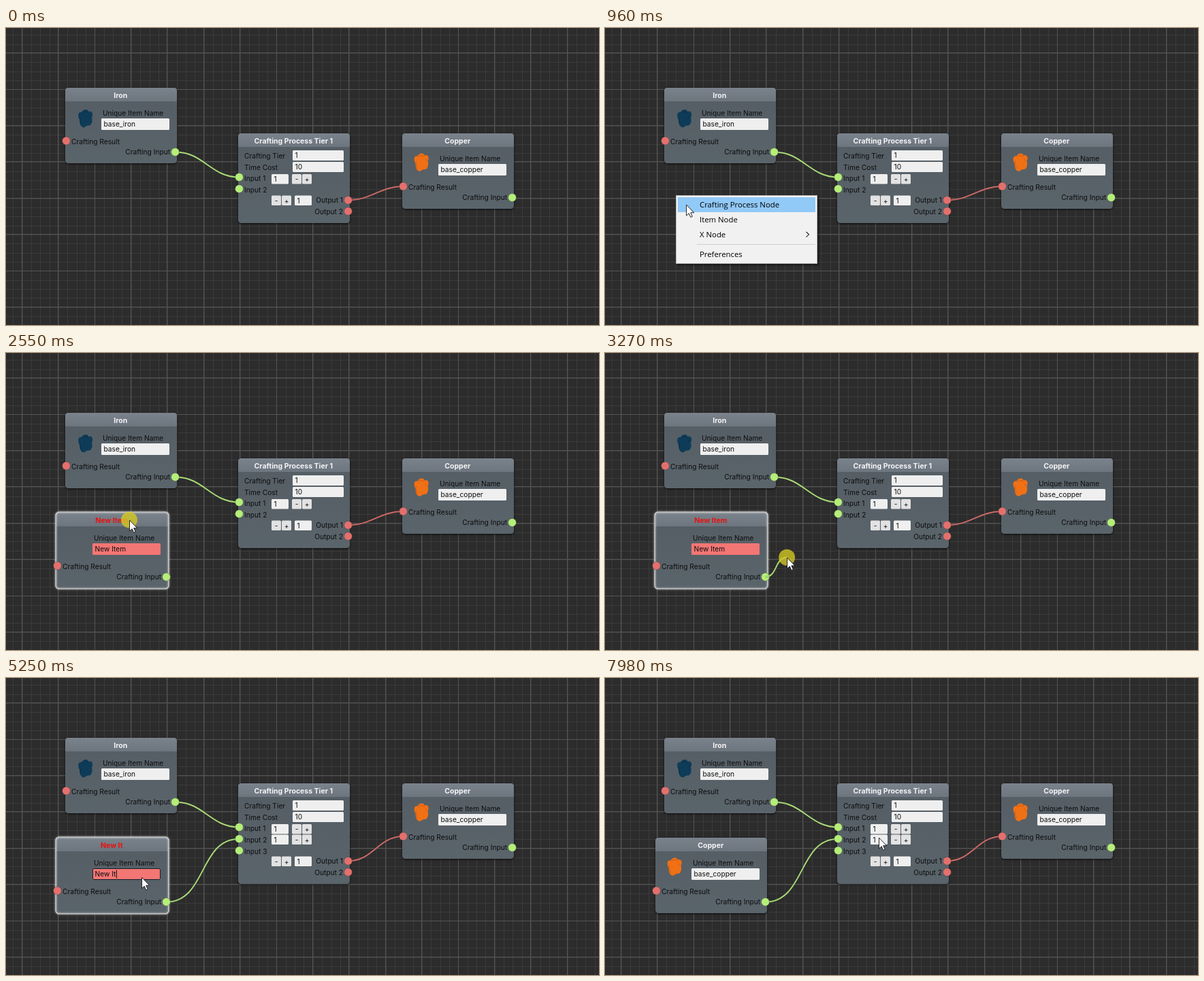
Recreate the animation shown at these times as an HTML page. Size 871 by 437 pixels, loop 8000 ms.

```html
<!DOCTYPE html>
<html lang="en">
<head>
<meta charset="utf-8">
<title>Crafting graph</title>
<style>
html, body { margin: 0; width: 100%; height: 100%; overflow: hidden; background: #2c2c2c; }
svg { display: block; width: 871px; height: 437px; }
text { font: 10.2px Inter, sans-serif; fill: #0c0d0e; white-space: pre; }
.title { font-size: 10.5px; font-weight: 700; text-anchor: middle; }
.end { text-anchor: end; }
.mid { text-anchor: middle; }
.menu text { font: 11.35px "Open Sans", sans-serif; fill: #000; }
.body { fill: url(#body); filter: drop-shadow(0 1px 1.5px rgba(0,0,0,.75)); }
.glow { fill: none; stroke: #dcdcdc; stroke-width: 1.3; filter: drop-shadow(0 0 1.6px #fff); }
.panel { filter: drop-shadow(2px 2px 1.5px rgba(0,0,0,.5)); }
</style>
</head>
<body>
<svg viewBox="0 0 871 437" xmlns="http://www.w3.org/2000/svg">
  <defs>
    <linearGradient id="head" x2="0" y2="1"><stop stop-color="#7a828c"/><stop offset="1" stop-color="#6d757f"/></linearGradient>
    <linearGradient id="body" x2="0" y2="1"><stop stop-color="#555d64"/><stop offset="1" stop-color="#5a646b"/></linearGradient>
  </defs>
  <g id="grid"></g>
  <g id="scene"></g>
</svg>
<script>
const LOOP = 8000, CELL = 13.35;
const GREEN = '#b5ee79', RED = '#e3706d', PAPER = '#efefef';
const GREEN_WIRE = '#a8d876', RED_WIRE = '#cb6a67';
const IRON = { x: 87, y: 88 }, COPPER = { x: 582, y: 155 }, SPAWN = { x: 108, y: 251 };
const PROCESS = { x: 341, y: 155 };
const GRAB = { x: 107, y: 11 };

const MENU_OPEN = 790, MENU_PICK = 1660, SPAWNED = 1680;
const GRABBED = 2080, DRAG_START = 2120, DROPPED = 2640;
const WIRE_START = 3040, WIRED = 3560;
const FOCUSED = 4400, MATCHED = 6670, BLURRED = 7210;

// Pointer path: time, x, y
const PATH = [
  [240, 740, 412], [480, 425, 180], [720, 104, 246], [830, 104, 246], [960, 119, 259.5], [1060, 121, 262],
  [1280, 150, 275], [1480, 186, 277.5], [1860, 186, 277.5], [2060, 215, 262], [2120, 215, 262],
  [2400, 168, 241], [2550, 181, 245.5], [2680, 181, 245.5], [2820, 152, 285], [3010, 236, 331],
  [3090, 236, 331], [3490, 333, 238], [3540, 341, 234], [3600, 341, 234], [4050, 244.5, 263],
  [4250, 197, 289], [4360, 199, 293], [6960, 199, 293], [7140, 201, 352], [7240, 201, 352],
  [7560, 355, 270], [7770, 412, 235], [7860, 413, 232], [7980, 402, 234.5], [8000, 402, 234.5]
];
const PRESSES = [[730, 810], [1560, 1660], [GRABBED, DROPPED], [WIRE_START, WIRED], [FOCUSED, 4510], [7150, BLURRED]];

const steps = (from, to, count) =>
  Array.from({ length: count }, (_, i) => from + (to - from) * i / (count - 1));
const ERASE = [4930, 5250, ...steps(5300, 5390, 6)];
const TYPE = [...steps(5550, 5780, 4), ...steps(6120, MATCHED, 7)];
const passed = (times, t) => times.filter(at => t >= at).length;

const within = (t, from, to) => t >= from && t < to;
const clamp01 = v => Math.max(0, Math.min(1, v));

function slope(i, axis) {
  const a = PATH[i - 1], p = PATH[i], b = PATH[i + 1];
  const same = q => q[1] === p[1] && q[2] === p[2];
  return !a || !b || same(a) || same(b) ? 0 : (b[axis] - a[axis]) / (b[0] - a[0]);
}

function pointer(t) {
  const i = Math.max(0, PATH.findIndex(p => p[0] > t) - 1);
  const a = PATH[i], b = PATH[i + 1], span = b[0] - a[0], u = clamp01((t - a[0]) / span);
  const at = axis =>
    a[axis] * (1 + 2 * u) * (1 - u) ** 2 + b[axis] * u * u * (3 - 2 * u) +
    span * (slope(i, axis) * u * (1 - u) ** 2 + slope(i + 1, axis) * u * u * (u - 1));
  return { x: at(1), y: at(2) };
}

const snap = (v, origin) => Math.round(origin + CELL * Math.round((v - origin) / CELL));

function itemPosition(t) {
  if (t < DRAG_START) return SPAWN;
  const p = pointer(Math.min(t, 2600));
  return { x: snap(p.x - GRAB.x, IRON.x), y: snap(p.y - GRAB.y, IRON.y) };
}

const pen = document.createElement('canvas').getContext('2d');
function textWidth(s) {
  pen.font = '10.2px Inter, sans-serif';
  return pen.measureText(s).width;
}

const text = (x, y, s, cls = '', fill = '') =>
  `<text x="${x}" y="${y}" class="${cls}"${fill && ` style="fill:${fill}"`}>${s}</text>`;
const rect = (x, y, w, h, attrs) => `<rect x="${x}" y="${y}" width="${w}" height="${h}" ${attrs}/>`;
const port = (x, y, color) =>
  `<circle cx="${x}" cy="${y}" r="5.9" fill="${color}" stroke="#30363a" stroke-opacity=".6" stroke-width=".6"/>`;
const field = (x, y, w, h, s, fill = PAPER) =>
  rect(x, y, w, h, `rx="1.5" fill="${fill}"`) + text(x + 3.5, y + h / 2 + 3.8, s);
const button = (x, y, s) =>
  rect(x, y, 14, 14.5, 'rx="1.5" fill="#e2e2e2"') + text(x + 7, y + 11, s, 'mid');

function wire(a, b, color) {
  const reach = Math.hypot(b.x - a.x, b.y - a.y) * .417;
  const d = `M${a.x} ${a.y}C${a.x + reach} ${a.y} ${b.x - reach} ${b.y} ${b.x} ${b.y}`;
  return `<path d="${d}" fill="none" stroke="#1e2120" stroke-opacity=".25" stroke-width="3.2"/>` +
    `<path d="${d}" fill="none" stroke="${color}" stroke-width="2"/>`;
}

function frame(h, title, color, selected) {
  return rect(0, 0, 164, h, 'rx="4.5" class="body"') +
    '<path d="M0 20V4.5Q0 0 4.5 0H159.500Q164 0 164 4.500V20Z" fill="url(#head)"/>' +
    (selected ? rect(-.9, -.9, 165.8, h + 1.8, 'rx="5" class="glow"') : '') +
    text(81.3, 15, title, 'title', color);
}

const ore = (x, y, color, shade) =>
  `<g transform="translate(${x} ${y})">
    <path d="M0 8Q1 3 5 4Q7 0 11 0Q15 0 15 3Q20 1 21 6Q22 9 20 11Q22 18 18 23L12 24Q9 28 5 25Q2 22 2 15Q0 12 0 8Z" fill="${color}"/>
    <path d="M6 5Q11 1 15 5M3 11Q2 17 5 22M17 8L18 11" fill="none" stroke="${shade}" stroke-width="1.3" opacity=".5"/>
  </g>`;
const blueOre = ore(19, 32, '#0e3c58', '#0a2c42');
const orangeOre = ore(17.5, 29.5, '#f07015', '#c9540f');

function itemNode(pos, o) {
  return `<g transform="translate(${pos.x} ${pos.y})">` +
    frame(111, o.title, o.titleColor || '#f3f4f5', o.selected) + (o.icon || '') +
    text(55, 41, 'Unique Item Name') +
    field(53, 45, 100, 17, o.name, o.fill) +
    (o.focused ? rect(53.5, 45.5, 99, 16, 'rx="1.5" fill="none" stroke="#15202c"') +
      rect(57 + textWidth(o.name), 47.5, 1, 12, 'fill="#111"') : '') +
    text(9, 83, 'Crafting Result') + text(154, 98, 'Crafting Input', 'end') +
    port(1.5, 78, RED) + port(161.5, 94.5, GREEN) + '</g>';
}

function processNode(linked) {
  const shift = linked ? 16 : 0;
  const amount = y => field(49, y, 25, 14.5, '1') + button(79, y, '-') + button(94, y, '+');
  let s = `<g transform="translate(${PROCESS.x} ${PROCESS.y})">` +
    frame(132 + shift, 'Crafting Process Tier 1', '#f3f4f5') +
    text(9, 37, 'Crafting Tier') + field(80, 25, 75, 15, '1') +
    text(9, 54, 'Time Cost') + field(80, 42, 75, 15, '10') +
    amount(60) + (linked ? amount(75.5) : '');
  for (let i = 0; i < (linked ? 3 : 2); i++)
    s += text(9, 70 + i * 16.8, `Input ${i + 1}`) + port(1.5, 64.5 + i * 17.2, GREEN);
  s += button(49, 91.5 + shift, '-') + button(64, 91.5 + shift, '+') + field(83, 91.5 + shift, 25, 14.5, '1');
  for (let i = 0; i < 2; i++)
    s += text(154, 102 + shift + i * 16.5, `Output ${i + 1}`, 'end') + port(161.5, 98.3 + shift + i * 16.4, RED);
  return s + '</g>';
}

function craftedNode(t) {
  const matched = t >= MATCHED;
  const typed = passed(TYPE, t);
  const name = typed ? 'base_copper'.slice(0, typed) : 'New Item'.slice(0, 8 - passed(ERASE, t));
  return itemNode(itemPosition(t), {
    name,
    title: matched ? 'Copper' : name,
    titleColor: matched ? '' : '#e8120f',
    fill: matched ? PAPER : '#f27674',
    icon: matched ? orangeOre : '',
    selected: within(t, GRABBED, BLURRED),
    focused: within(t, FOCUSED, BLURRED)
  });
}

const highlight = y => rect(107, y, 202, 22, 'fill="#91c9f7"');

function menu(t, p) {
  if (within(t, MENU_PICK, 1840))
    return `<g class="menu" opacity="${.45 * clamp01((1840 - t) / 140)}">${highlight(271)}${text(139, 286, 'Item Node')}</g>`;
  if (!within(t, MENU_OPEN, MENU_PICK)) return '';
  const hover = p.y < 249 ? '' : highlight(p.y < 271 ? 249 : 271);
  return `<g class="menu" opacity="${clamp01((t - MENU_OPEN + 20) / 130)}">` +
    rect(104.5, 246.5, 207, 100, 'fill="#f1f1f1" stroke="#b5b5b5" class="panel"') + hover +
    text(139, 264, 'Crafting Process Node') + text(139, 286, 'Item Node') + text(139, 308, 'X Node') +
    text(139, 337, 'Preferences') + rect(135, 318, 174, 1, 'fill="#cfcfcf"') +
    '<path d="M295.500 300L299.500 303.800 295.500 307.600" fill="none" stroke="#222" stroke-width="1.1"/></g>';
}

function mouse(t, p) {
  if (t < 240) return '';
  const pressed = PRESSES.some(([from, to]) => within(t, from, to));
  return (pressed ? `<circle cx="${p.x}" cy="${p.y}" r="12" fill="#d6cb22" opacity=".78"/>` : '') +
    `<path transform="translate(${p.x} ${p.y})" d="M.5 .5V16.500L4.200 13.200 6.700 18.900 9.200 17.800 6.700 12.200H11.700Z" fill="#fff" stroke="#111" stroke-width=".9"/>`;
}

function draw(t) {
  const p = pointer(t), linked = t >= WIRED, item = itemPosition(t);
  const inPort = y => ({ x: PROCESS.x + 1.5, y });
  const itemOut = { x: item.x + 161.5, y: item.y + 94.5 };
  let s = wire({ x: 248.5, y: 182.5 }, inPort(219.5), GREEN_WIRE) +
    wire({ x: 502.5, y: linked ? 269.3 : 253.3 }, { x: 583.5, y: 233 }, RED_WIRE);
  if (linked) s += wire(itemOut, inPort(236.7), GREEN_WIRE);
  s += itemNode(IRON, { title: 'Iron', name: 'base_iron', icon: blueOre }) +
    processNode(linked) +
    itemNode(COPPER, { title: 'Copper', name: 'base_copper', icon: orangeOre });
  if (t >= SPAWNED) s += craftedNode(t);
  if (within(t, WIRE_START, WIRED)) s += wire(itemOut, p, GREEN_WIRE);
  scene.innerHTML = s + menu(t, p) + mouse(t, p);
}

// Each major line sits one texel before a minor one.
function drawGrid() {
  const cross = (x, y) => `M${Math.round(x) + .5} 0V437M0 ${Math.round(y) + .5}H871`;
  let minor = '', major = '';
  for (let i = -4; i < 68; i++) {
    const x = 22.8 + i * CELL, y = 36.2 + i * CELL;
    minor += cross(x + .8, y + .8);
    if (i % 4 === 0) major += cross(x, y);
  }
  grid.innerHTML = `<path d="${minor}" stroke="#3b3b3b"/><path d="${major}" stroke="#555"/>`;
}

const grid = document.getElementById('grid'), scene = document.getElementById('scene');
const start = performance.now();
function tick() {
  draw((performance.now() - start) % LOOP);
  requestAnimationFrame(tick);
}
drawGrid();
tick();
</script>
</body>
</html>
```
